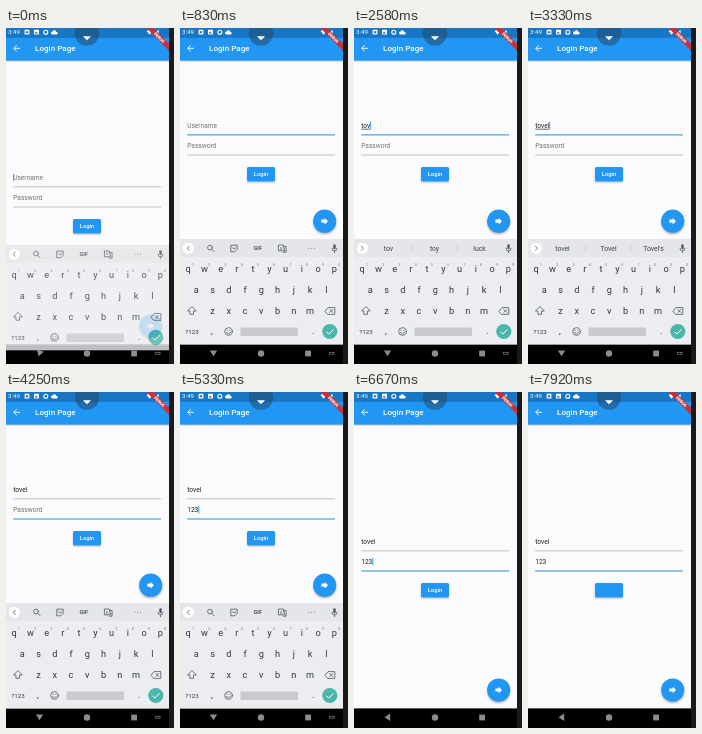
Recreate the animation shown at these times as an HTML page. Size 168 by 336 pixels, loop 8 s.

```html
<!DOCTYPE html>
<html lang="en">
<head>
<meta charset="utf-8">
<title>Login Page</title>
<style>
html, body { margin: 0; width: 100%; height: 100%; overflow: hidden; background: #1a1a1a; }
svg { display: block; width: 100%; height: 100%; font-family: Roboto, sans-serif; }
.mid { text-anchor: middle; }
.field { font-size: 6.6px; fill: #212121; }
.key { font-size: 9.2px; fill: #32373b; text-anchor: middle; }
.hint { font-size: 3.4px; fill: #6b7176; text-anchor: middle; }
.word { font-size: 6.8px; fill: #3c4347; text-anchor: middle; }
.line { fill: none; stroke: #50565b; stroke-width: .8; stroke-linejoin: round; stroke-linecap: round; }
.white { fill: #fff; }
.nav { fill: #8c8c8c; }
</style>
</head>
<body>
<svg viewBox="0 0 168 336" preserveAspectRatio="none">
  <defs>
    <filter id="soft" x="-50%" y="-50%" width="200%" height="200%"><feGaussianBlur stdDeviation="1.3"/></filter>
    <clipPath id="screen"><rect width="163" height="336"/></clipPath>
  </defs>
  <g clip-path="url(#screen)">
  <rect width="163" height="336" fill="#fbfafc"/>

  <g id="form">
    <text id="user" class="field" x="7.2" y="151.8"></text>
    <rect id="userLine" x="7.2" width="147.8"/>
    <text id="pass" class="field" x="7.2" y="172"></text>
    <rect id="passLine" x="7.2" width="147.8"/>
    <rect id="caret" width=".9" height="7.4" fill="#2196f3"/>
    <rect x="67" y="192" width="28" height="14.6" rx="1.6" opacity=".22" filter="url(#soft)"/>
    <rect x="67" y="191" width="28" height="14.6" rx="1.6" fill="#2196f3"/>
    <text id="login" class="mid white" x="81" y="200.4" font-size="5.8" font-weight="500">Login</text>
  </g>

  <g id="fab">
    <circle cy="1.8" r="11.3" opacity=".3" filter="url(#soft)"/>
    <circle r="11.6" fill="#2196f3"/>
    <path class="white" d="M0-1.6V-3.3L3.3 0L0 3.3V1.6H-3.3V-1.6Z"/>
  </g>

  <rect width="163" height="32.7" fill="#2196f3"/>
  <rect y="32.7" width="163" height="1" opacity=".14"/>
  <rect width="163" height="9.8" fill="#1976c2"/>
  <text class="white" x="2" y="6.2" font-size="6.2">3:49</text>
  <path class="white" d="M18.6 1.8h4.8v4.8h-4.8zM28 1.8h5v4.8h-5z"/>
  <path d="M19.8 3.2h2.4v2h-2.4zM29 4.8l1.2-1.2l1.8 1.8h-3z" fill="#1976c2"/>
  <circle cx="39.8" cy="4.2" r="2" fill="none" stroke="#fff" stroke-width="1.1"/>
  <path class="white" d="M46.4 6.4a1.5 1.5 0 0 1 .2-3a2 2 0 0 1 3.8 .6a1.2 1.2 0 0 1 .2 2.4z"/>
  <path class="white" d="M140.6 3q3-2.2 6 0l-3 3.8zM152.6 1.8v4.9h-4.9z"/>
  <path d="M14 20.3H7.8M10.8 17.2L7.7 20.3L10.8 23.4" fill="none" stroke="#fff" stroke-width=".9"/>
  <text class="white" x="29" y="23.3" font-size="8.1" font-weight="500">Login Page</text>
  <circle cx="81" cy="5.5" r="12.2" fill="#24435f" opacity=".5"/>
  <path class="white" d="M76.9 8.2h8.2L81 12.3z"/>
  <g transform="translate(163 0) rotate(45)">
    <rect x="-16.4" y="11.2" width="32.8" height="4.8" fill="#c9303a"/>
    <text class="mid white" y="15.1" font-size="4.1" font-weight="900">DEBUG</text>
  </g>

  <rect y="316.4" width="163" height="19.6"/>

  <g id="keyboard">
    <rect y="211" width="163" height="105.4" fill="#ecedf1"/>
    <rect y="211" width="163" height="18" fill="#e5e6e9"/>
    <circle cx="8.3" cy="220.3" r="5.6" fill="#fff"/>
    <path id="chevron" class="line"/>
    <g id="tools">
      <circle class="line" cx="30" cy="219.6" r="2.4"/><path class="line" d="M31.8 221.4l2.3 2.3"/>
      <path class="line" d="M51.2 217.2h6v4.2l-2.4 2.4h-3.6zM52.7 220q1.5 2 3 0"/>
      <text class="mid" x="77.8" y="222.3" font-size="5.7" font-weight="700" fill="#50565b">GIF</text>
      <path class="line" d="M98.8 217h4.4l1.6 5.8h-6zM103.4 218.4h2.7v5.8h-3"/>
      <text class="mid" x="101.2" y="221.5" font-size="4" fill="#50565b">G</text>
      <path class="line" d="M128.8 220.3h.1M131.6 220.3h.1M134.4 220.3h.1" stroke-width="1.3"/>
    </g>
    <g id="words">
      <text class="word" x="34.5" y="222.7"></text>
      <text class="word" x="80.5" y="222.7"></text>
      <text class="word" x="125.5" y="222.7"></text>
      <path d="M57.5 216v9M103 216v9" stroke="#c3c9cc" stroke-width=".6"/>
    </g>
    <rect x="153.3" y="216.2" width="2.4" height="5" rx="1.2" fill="#50565b"/>
    <path class="line" d="M152 220.3q0 2.7 2.5 2.7t2.5-2.7M154.5 223v1.6"/>
    <g id="keys"></g>
    <path class="line" d="M11.7 278.8l-4.2 4.2h2.4v3.3h3.6v-3.3h2.4z"/>
    <path class="line" d="M145.2 283l2.8-3.4h6.8v6.8h-6.8zM149.8 281.5l3 3M152.8 281.5l-3 3"/>
    <text class="mid" x="12" y="305.8" font-size="6.2" fill="#32373b">?123</text>
    <text class="key" x="32" y="306">,</text>
    <circle class="line" cx="48.5" cy="303.5" r="3.8"/>
    <path class="line" d="M46.5 304.6q2 2.4 4 0M47.1 302.2v.3M49.9 302.2v.3"/>
    <rect x="60.5" y="299.6" width="57.5" height="8.4" rx="1" fill="#c8cacd"/>
    <text class="key" x="133.3" y="306">.</text>
    <circle cx="149.8" cy="303.5" r="7.6" fill="#4db6ac"/>
    <path d="M146.4 303.7l2.4 2.4l4.8-4.8" fill="none" stroke="#fff" stroke-width="1"/>
  </g>

  <path id="back" class="nav" d="M-3.7-2.7h7.4L0 3z"/>
  <circle class="nav" cx="81" cy="325.5" r="3.2"/>
  <rect class="nav" x="125.2" y="322.6" width="5.8" height="5.8"/>
  <path id="switch" d="M149 324.4h6M149 326.2h6" stroke="#8c8c8c" stroke-width="1" stroke-dasharray="1 .4"/>
  </g>
</svg>
<script>
const $ = id => document.getElementById(id);
const LOOP = 8000, PASS_FOCUS = 3750, HIDE = 6250, SUBMIT = 7600;
const PITCH = 16.25, LEFT = 7.2;
const clamp = x => Math.max(0, Math.min(1, x));

// [start time, value, suggestions]
const userSteps = [
  [0, ""],
  [1080, "t", ["t", "the", "to"]],
  [1230, "to", ["to", "too", "today"]],
  [1390, "tov", ["tov", "toy", "luck"]],
  [1550, "tovf", ["tovf", "tovel", "luck"]],
  [1700, "tovfe", ["tovfe", "tovel", "luck"]],
  [2150, "tovf", ["tovf", "tovel", "luck"]],
  [2320, "tov", ["tov", "toy", "luck"]],
  [2650, "tove", ["tove", "tovel", "love"]],
  [2870, "tovel", ["tovel", "Tovel", "Tovel's"]]
];
const passSteps = [PASS_FOCUS, 4600, 4900, 5200].map((at, i) => [at, "123".slice(0, i)]);

const stepAt = (steps, t) => steps.filter(s => s[0] <= t).pop() || [0, ""];

function set(el, attrs) {
  for (const k in attrs) el.setAttribute(k, attrs[k]);
}

function addText(cls, x, y, str) {
  const el = document.createElementNS("http://www.w3.org/2000/svg", "text");
  set(el, { class: cls, x, y });
  el.textContent = str;
  $("keys").append(el);
}

["qwertyuiop", "asdfghjkl", "zxcvbnm"].forEach((row, r) => {
  [...row].forEach((ch, i) => {
    const x = PITCH * ([.5, 1, 2][r] + i), y = 244 + r * 21;
    addText("key", x, y, ch);
    if (!r) addText("hint", x + 4.8, y - 6, (i + 1) % 10);
  });
});

function showField(id, value, label, focused, y) {
  const el = $(id);
  el.textContent = value || label;
  el.style.fill = value ? "#212121" : "#757575";
  set($(id + "Line"), {
    y: focused ? y - .2 : y,
    height: focused ? 1 : .6,
    fill: focused ? "#2a92d4" : "#989898"
  });
}

function draw(t) {
  const onPass = t >= PASS_FOCUS;
  const user = stepAt(userSteps, t), pass = stepAt(passSteps, t);
  const keysUp = t >= 80 && t < HIDE;

  showField("user", user[1], "Username", !onPass && t >= 80, 158.6);
  showField("pass", pass[1], "Password", onPass, 178.7);
  $("user").style.textDecoration = user[1] && !onPass ? "underline" : "none";

  const id = onPass ? "pass" : "user", active = onPass ? pass : user;
  const width = active[1] ? $(id).getComputedTextLength() : 0;
  set($("caret"), {
    x: LEFT + width,
    y: onPass ? 166 : 145.8,
    opacity: (t - active[0]) % 1000 < 500 ? 1 : 0
  });

  set($("form"), { transform: `translate(0 ${keysUp ? -52 : 0})` });
  set($("fab"), { transform: `translate(144.7 ${keysUp ? 193.2 : 298})` });
  $("login").style.display = t < SUBMIT ? "" : "none";

  const away = t < HIDE ? .2 * clamp(1 - t / 80) : clamp((t - HIDE) / 170);
  set($("keyboard"), { transform: `translate(0 ${30 * away})`, opacity: 1 - away });
  set($("back"), { transform: `translate(33.5 325.3) rotate(${90 * away})` });
  $("switch").style.display = t < HIDE ? "" : "none";

  const words = !onPass && user[2];
  $("tools").style.display = words ? "none" : "";
  $("words").style.display = words ? "" : "none";
  if (words) $("words").querySelectorAll("text").forEach((el, i) => el.textContent = words[i]);
  set($("chevron"), { d: words ? "M7.3 218.2l2.1 2.1l-2.1 2.1" : "M9.3 218.2l-2.1 2.1l2.1 2.1" });
}

const start = performance.now();
function frame() {
  draw((performance.now() - start) % LOOP);
  requestAnimationFrame(frame);
}
frame();
</script>
</body>
</html>
```
